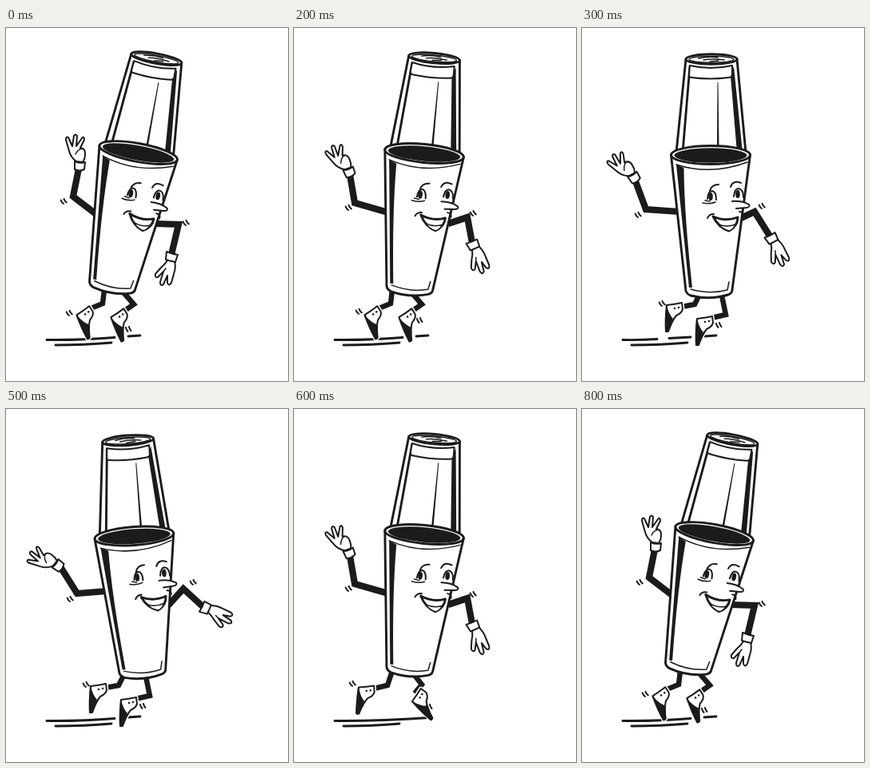
Recreate the animation shown at these times as an HTML page. Size 353 by 442 pixels, loop 900 ms.

```html
<!DOCTYPE html>
<html lang="en">
<head>
<meta charset="utf-8">
<title>Dancing shaker</title>
<style>
  html, body { margin: 0; width: 100%; height: 100%; overflow: hidden; background: #fff; }
  svg { display: block; width: 100vw; height: 100vh; }
  path, ellipse { stroke: #1b1b1b; fill: none; stroke-width: 2; stroke-linecap: round; stroke-linejoin: round; }
  .ink { fill: #1b1b1b; stroke: none; }
  .paper { fill: #fff; }
  .bold { stroke-width: 2.9; }
  .thin { stroke-width: 1.5; }
  .limb { stroke-linecap: butt; stroke-linejoin: miter; }
  .halo { stroke: #fff; stroke-width: 5; fill: #fff; }
</style>
</head>
<body>
<svg id="stage" viewBox="0 0 353 442"></svg>
<script>
const path = (d, cls = '') => `<path class="${cls}" d="${d}"/>`;
const oval = (x, y, rx, ry, cls = '') => `<ellipse class="${cls}" cx="${x}" cy="${y}" rx="${rx}" ry="${ry}"/>`;
const place = ([x, y, turn], art) => `<g transform="translate(${x} ${y}) rotate(${turn})">${art}</g>`;
const limb = (points, width) =>
  `<path class="limb" style="stroke-width:${width}" d="M${points}"/>`;

const glass =
  path('M130 39L118 156H205L194 39Z', 'paper bold') +
  path('M135 48L126 156', 'bold') +
  path('M186 60L190 48L201 156L194 156Z', 'ink') +
  path('M135 47Q161 53 188 47L188 59Q187 62 184 62Q161 65 137 62Q134 62 134 59Z', 'paper') +
  path('M169.500 68L170.500 68L171.500 148L169 148Z', 'ink') +
  oval(162, 39, 32, 6.2, 'paper bold') +
  oval(162, 39.300, 28, 4, 'thin') +
  path('M146 38Q158 35 170 37M152 40Q164 38 178 40M160 42L171 41', 'thin');

const cup =
  path('M111.500 159L130 329Q131 333 136 335Q160 341 183 334Q188 332 188 328L210.500 159Z', 'paper bold') +
  oval(161, 159, 49.500, 11.5, 'paper bold') +
  oval(161, 159.500, 45.500, 9.2, 'ink') +
  path('M118 171Q161 185 207 168', 'thin') +
  path('M118 171L127.500 175Q128 235 138 325L134 325Z', 'ink') +
  path('M136 327Q160 334 182 328L184 318', 'thin');

const face =
  path('M160 204Q162 196 171 196M186 199Q189 190 199 194') +
  path('M157 214Q158 204 163 204Q168 205 168 215M190 211Q191 201 196 201Q202 202 202 212') +
  oval(161, 211, 2.800, 5, 'ink') + oval(195, 208, 2.800, 5, 'ink') +
  path('M151 219Q160 221 167 218M154 216L160 217', 'thin') +
  path('M188 217Q200 216 209 221Q211 224 206 225L193 226', 'paper') +
  path('M164 236Q180 243 195 237Q195 248 184 254Q171 250 164 236Z', 'paper bold') +
  path('M171 246Q181 250 192 246Q189 253 184 254Q176 252 171 246Z', 'paper thin') +
  path('M157 238Q159 233 165 233M197 230Q202 230 202 235');

const cuff = 'M-6 -5Q1 -2 7 -4L6 5Q0 8 -6 5Z';
const raisedHand =
  path('M-4 -5Q-11 -10 -13 -18L-17 -32Q-17 -37 -14 -35L-9 -24L-7 -37Q-5 -40 -3 -37L-4 -24L3 -34Q6 -37 6 -32L1 -22Q8 -21 7 -13Q7 -8 4 -4Z', 'paper') +
  path('M-5 -14Q-2 -20 3 -21', 'thin') + path(cuff, 'paper');
const loweredHand =
  path('M-5 5Q-8 10 -13 14L-20 22Q-21 27 -17 26L-10 19L-14 32Q-14 38 -10 35L-5 24L-5 33Q-3 38 0 33L3 22Q6 14 4 5Z', 'paper') +
  path('M-10 19L-7 15', 'thin') +
  path('M-6 -6Q1 -3 8 -2L5 7Q-1 6 -7 4Z', 'paper');

const shoeShape = 'M-10 1Q0 0 9 -2L10 6Q9 11 2 14Q-3 20 -8 34L-11 34Z';
const shoe =
  path(shoeShape, 'halo') + path(shoeShape, 'paper') +
  path('M-11 1Q-13 20 -12 34Q-9 37 -7 33Q-5 24 -2 18Q-7 13 -10 1Z', 'ink') +
  oval(0, 5, 1.300, 1.300, 'ink') + oval(5, 4, 1.300, 1.300, 'ink');

const tick = path('M-3 -2Q-2.500 1 -0.500 3M1 -3Q1.500 0 3.500 2');

const groundParts = {
  lower: 'M62 397Q98 397 132 394',
  left: 'M51 390.500Q73 391 94 389.500',
  right: 'M109 388.500L136 387',
  whole: 'M51 390.500Q95 391 136 387.500',
  end: 'M153 386L168 385',
  long: 'M51 390.500Q104 391 169 386.500'
};

const steps = {
  planted: {
    legs: ['123 328L121 345L104 352', '147 331L160 346L147 355'],
    shoes: [[97, 354, -26], [140, 357, -25]],
    ground: ['whole', 'end', 'lower']
  },
  hop: {
    legs: ['147 334L141 346L125 349', '175 335L180 359L162 363'],
    shoes: [[116, 346, 0], [154, 363, 0]],
    ticks: [[100, 345, -10], [171, 372, 0]]
  },
  stride: {
    legs: ['123 328L117 346L100 350', '149 331L160 345L151 356'],
    shoes: [[91, 348, 3], [154, 358, -47]],
    ticks: [[73, 344, -10], [169, 373, 0]],
    ground: ['long', 'lower']
  }
};

const poses = {
  back: {
    lean: [4.5, -3, 10.4],
    arms: ['114 234L84 211L91 176', '186 245L216 246L207 284'],
    hands: [[92, 172, 0], [207, 286, 0]],
    ticks: [[72, 217, -10], [225, 244, -10]]
  },
  upright: {
    lean: [2, -2, 5.5],
    arms: ['118 231L76 219L70 184', '193 245L217 237L223 269'],
    hands: [[69, 180, -25], [224, 271, -38]],
    ticks: [[68, 225, -10], [224, 232, -10]]
  },
  centre: {
    lean: [0, 0, 0],
    arms: ['122 230L80 227L67 192', '199 238L216 230L236 262'],
    hands: [[65, 187, -35], [237, 263, -42]],
    ticks: [[70, 234, -10], [225, 223, -10]]
  },
  forward: {
    lean: [-0.5, 0, -4.2],
    arms: ['126 228L89 231L69 199', '203 246L222 225L247 248'],
    hands: [[65, 196, -57], [249, 249, -80]],
    ticks: [[80, 238, -10], [234, 217, -10]]
  }
};

function draw(pose, step, footTicks = step.ticks, ground = step.ground) {
  const [dx, dy, turn] = pose.lean;
  return ground.map(part => path(groundParts[part], 'bold')).join('') +
    step.legs.map(leg => limb(leg, 6.5)).join('') +
    step.shoes.map(spot => place(spot, shoe)).join('') +
    pose.arms.map(arm => limb(arm, 8.2)).join('') +
    `<g transform="translate(${dx} ${dy}) rotate(${turn} 161 160)">${glass}${cup}${face}</g>` +
    place(pose.hands[0], raisedHand) + place(pose.hands[1], loweredHand) +
    [...pose.ticks, ...footTicks].map(spot => place(spot, tick)).join('');
}

const { planted, hop, stride } = steps;
const backView = draw(poses.back, planted, [[79, 357, -10], [153, 377, 0]]);
const timeline = [
  [200, backView],
  [300, draw(poses.upright, planted, [[81, 355, -10], [157, 366, 0]])],
  [500, draw(poses.centre, hop, hop.ticks, ['left', 'right', 'end', 'lower'])],
  [600, draw(poses.forward, hop, hop.ticks, ['whole', 'end', 'lower'])],
  [800, draw(poses.upright, stride)],
  [900, backView]
];

const stage = document.getElementById('stage');
const start = performance.now();
let shown;
function render() {
  const time = Math.max(0, performance.now() - start) % 900;
  const view = timeline.find(([end]) => time < end)[1];
  if (view !== shown) stage.innerHTML = shown = view;
  requestAnimationFrame(render);
}
render();
</script>
</body>
</html>
```
